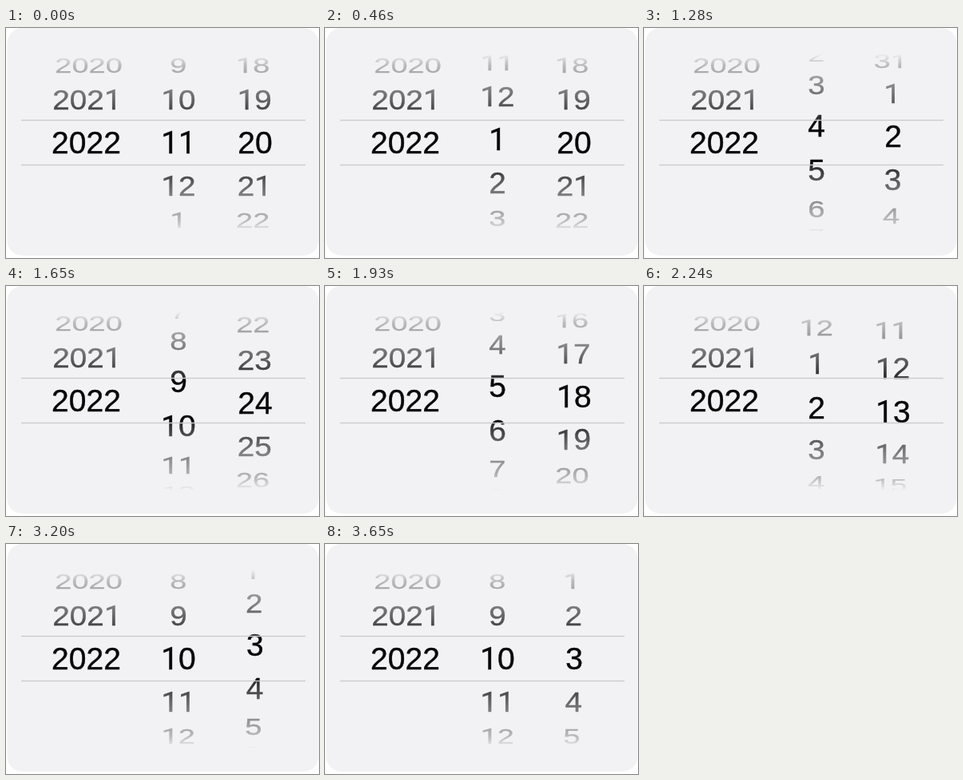
An HTML page with a canvas that plays this animation: 392x288 px, repeating every 4.18 s.

```html
<!DOCTYPE html>
<html lang="en">
<head>
<meta charset="utf-8">
<title>Date wheel</title>
<style>
  html, body { margin: 0; width: 100%; height: 100%; overflow: hidden; background: #fff; }
  canvas { display: block; }
</style>
</head>
<body>
<canvas id="stage" width="392" height="288"></canvas>
<script>
const ctx = document.getElementById('stage').getContext('2d');
const LOOP = 4180, START = 150, STEP = 28.25;
const MID = 144, RADIUS = 138, ROW_ANGLE = 23.2 * Math.PI / 180;
const CAMERA = 1500, VANISH_X = 210;
const BAND_TOP = 115, BAND_BOTTOM = 171, TOP = 32, BOTTOM = 256;
const CARD = '#f2f2f4', INK = '#080808';
const DIGIT_WIDTH = 21.7, BASELINE = 13;
const DIGIT_FONT = '39px "Liberation Sans", Arial, sans-serif';
const ONE_FONT = '38.5px Roboto, sans-serif'; // a "1" without a foot

// [time, rows left]: each wheel brakes almost evenly, so the root falls nearly linearly.
const monthBrake = [[140, 49], [860, 28.23], [1650, 11.43], [2240, 3.84], [2580, 1.3], [3060, 0]];
const dayBrake = [[695, 48], [860, 42.62], [1650, 20.94], [2240, 9.74], [2580, 5.11], [3200, 0.31], [3650, 0]];

function rowsLeft(brake, t) {
  if (t <= brake[0][0]) return brake[0][1];
  for (let i = 1; i < brake.length; i++) {
    const [t0, a] = brake[i - 1], [t1, b] = brake[i];
    const k = (t - t0) / (t1 - t0);
    if (k < 1) return (Math.sqrt(a) * (1 - k) + Math.sqrt(b) * k) ** 2;
  }
  return 0;
}

const wrap = size => n => ((n - 1) % size + size) % size + 1;
const year = n => n > 2022 ? '' : n;

function drawNumber(number) {
  const digits = [...String(number)];
  digits.forEach((digit, i) => {
    const x = (i - (digits.length - 1) / 2) * DIGIT_WIDTH;
    ctx.font = digit === '1' ? ONE_FONT : DIGIT_FONT;
    ctx.fillText(digit, x, BASELINE);
    ctx.strokeText(digit, x, BASELINE);
  });
}

function drawWheel(x, position, label) {
  const nearest = Math.round(position);
  for (let n = nearest - 3; n <= nearest + 3; n++) {
    const angle = (n - position) * ROW_ANGLE;
    const scale = CAMERA / (CAMERA + RADIUS * (1 - Math.cos(angle)));
    ctx.save();
    ctx.translate(VANISH_X + (x - VANISH_X) * scale, MID + RADIUS * Math.sin(angle) * scale);
    ctx.scale(scale, scale * Math.cos(angle));
    drawNumber(label(n));
    ctx.restore();
  }
}

function fade(edge, band) {
  const shade = ctx.createLinearGradient(0, edge, 0, band);
  for (const [stop, alpha] of [[0, 1], [0.17, 0.77], [0.69, 0.4], [1, 0.13]])
    shade.addColorStop(stop, `rgba(242,242,244,${alpha})`);
  ctx.fillStyle = shade;
  ctx.fillRect(19, edge, 356, band - edge);
}

function draw(t) {
  ctx.clearRect(0, 0, 392, 288);
  ctx.fillStyle = CARD;
  ctx.beginPath();
  ctx.roundRect(1.5, 0, 390, 285, 19);
  ctx.fill();

  ctx.save();
  ctx.beginPath();
  ctx.rect(0, TOP, 392, BOTTOM - TOP);
  ctx.clip();
  ctx.fillStyle = ctx.strokeStyle = INK;
  ctx.lineWidth = 0.4;
  ctx.textAlign = 'center';
  drawWheel(100.5, 2022, year);
  drawWheel(216, 10 + rowsLeft(monthBrake, t), wrap(12));
  drawWheel(312, 3 + rowsLeft(dayBrake, t), wrap(31));
  fade(TOP, BAND_TOP);
  fade(BOTTOM, BAND_BOTTOM);
  ctx.restore();

  ctx.fillStyle = '#cbcbcd';
  for (const y of [BAND_TOP, BAND_BOTTOM]) ctx.fillRect(19, y - 0.2, 356, 1.4);
}

function tick() {
  const t = performance.now() % LOOP;
  const step = Math.floor((t - START + 5) / STEP);
  draw(START + Math.round(step * STEP / 10) * 10);
  requestAnimationFrame(tick);
}
tick();
</script>
</body>
</html>
```
